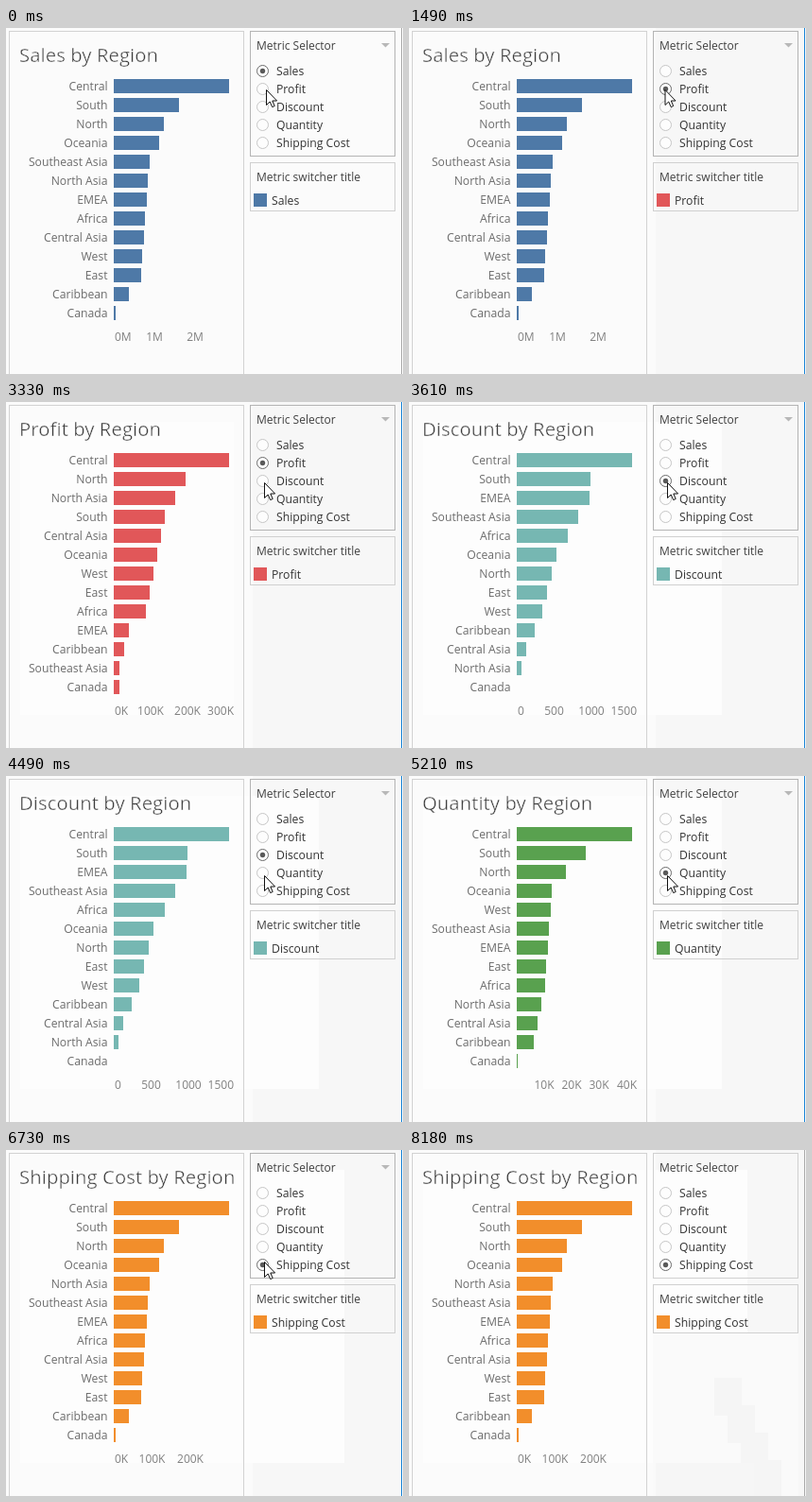
Animation of 420 by 366 pixels, one loop 8.23 s. Source, as an HTML page:

```html
<!DOCTYPE html>
<html lang="en">
<head>
<meta charset="utf-8">
<title>Metric switcher</title>
<style>
  html, body { margin: 0; width: 100%; height: 100%; overflow: hidden; background: #fbfbfb; }
  svg { display: block; }
  text { font: 12.2px "Open Sans", "Noto Sans", sans-serif; fill: #333; }
  /* The pale outline thins the strokes of the large heading. */
  .title { font-size: 20.3px; letter-spacing: .06px; fill: #3c3c3c; stroke: #fcfcfc; stroke-width: .45px; }
  .head { font-size: 12px; fill: #404040; }
  .label { fill: #6c6c6c; text-anchor: end; }
  .tick { font-size: 12px; fill: #808080; }
</style>
</head>
<body>
<svg id="stage" width="420" height="366" viewBox="0 0 420 366"></svg>
<script>
const LOOP = 8230;
const ROW = 20;
const AXIS = { zero: 114, left: 115, right: 241 };
const FOCUS = 1060, LEAVE = 7500, BLUR = 8180;

// Bar widths run straight between [row, width] key points.
const longTail = [[0, 122], [1, 69], [2, 53], [3, 48], [4, 37.5], [10, 29], [12, 2]];

const metrics = [
  { name: 'Sales', color: '#4e79a7', selected: 0, charted: 0,
    regions: 'Central,South,North,Oceania,Southeast Asia,North Asia,EMEA,Africa,Central Asia,West,East,Caribbean,Canada',
    curve: longTail, labels: '0M,1M,2M', spacing: 43 },
  { name: 'Profit', color: '#e15759', selected: 1490, charted: 1640,
    regions: 'Central,North,North Asia,South,Central Asia,Oceania,West,East,Africa,EMEA,Caribbean,Southeast Asia,Canada',
    curve: [[0, 122], [1, 76], [3, 54], [8, 34], [9, 16], [11, 6], [12, 6]],
    labels: '0K,100K,200K,300K', spacing: 39 },
  { name: 'Discount', color: '#76b7b2', selected: 3610, charted: 3610,
    regions: 'Central,South,EMEA,Southeast Asia,Africa,Oceania,North,East,West,Caribbean,Central Asia,North Asia,Canada',
    curve: [[0, 122], [1, 78], [2, 77], [5, 42], [8, 27], [10, 10], [12, 0]],
    labels: '0,500,1000,1500', spacing: 39.5 },
  { name: 'Quantity', color: '#59a14f', selected: 5210, charted: 5210,
    regions: 'Central,South,North,Oceania,West,Southeast Asia,EMEA,East,Africa,North Asia,Central Asia,Caribbean,Canada',
    curve: [[0, 122], [1, 73], [2, 52], [3, 37], [8, 30], [11, 18], [12, 1]],
    labels: ',10K,20K,30K,40K', spacing: 29 },
  { name: 'Shipping Cost', color: '#f28e2b', selected: 6730, charted: 6730,
    regions: 'Central,South,North,Oceania,North Asia,Southeast Asia,EMEA,Africa,Central Asia,West,East,Caribbean,Canada',
    curve: longTail, labels: '0K,100K,200K', spacing: 40.5 }
];

// Each move starts where the one before it ended.
const pointerStart = [275, 65];
const moves = [
  { start: 50, end: 380, to: [270.5, 65] },
  { start: 2480, end: 3210, to: [273, 85] },
  { start: 4110, end: 4490, to: [273, 105] },
  { start: 5670, end: 5960, to: [273, 118] },
  { start: 7410, end: 7620, to: [323, 241] },
  { start: 7620, end: 7840, to: [390, 368] }
];

const stage = document.getElementById('stage');

function add(tag, attrs, parent = stage, content) {
  const node = document.createElementNS('http://www.w3.org/2000/svg', tag);
  for (const key in attrs) node.setAttribute(key, attrs[key]);
  if (content !== undefined) node.textContent = content;
  parent.appendChild(node);
  return node;
}
const rect = (x, y, width, height, fill, parent) => add('rect', { x, y, width, height, fill }, parent);
const text = (x, y, cls, content, parent) => add('text', { x, y, class: cls }, parent, content);
const frame = (x, y, width, height, stroke) => add('rect', { x, y, width, height, stroke, fill: 'none' });
const show = (node, on) => node.setAttribute('visibility', on ? 'visible' : 'hidden');
const mix = (a, b, u) => a + (b - a) * u;

function widthAt(curve, row) {
  const next = Math.max(1, curve.findIndex(([key]) => key >= row));
  const [r0, w0] = curve[next - 1];
  const [r1, w1] = curve[next];
  return Math.round(mix(w0, w1, (row - r0) / (r1 - r0)));
}

// Backgrounds that appear once and stay until the loop restarts
const layers = [];
const layer = (time, ...box) => layers.push({ time, node: rect(...box) });
layer(FOCUS, 261, 0, 159, 366, '#f7f7f7');
layer(1640, 15, 21, 226, 310, '#fdfdfd');
layer(3610, 15, 21, 316, 310, '#fdfdfd');
layer(6730, 15, 21, 343, 310, '#fdfdfd');
layer(LEAVE, 258, 194, 154, 172, '#fafafa');
for (let i = 0; i < 4; i++) {
  layer(7600 + 50 * i, 323 + 14 * i, 241 + 29 * i, 29, 40, '#f5f5f5');
}
layer(7800, 261, 331, 104, 35, '#f6f6f6');

// Panels
frame(3.5, 3.5, 248, 370, '#d2d2d2');
const selectorFrame = frame(258.5, 3.5, 153, 132, '#b4b4b4');
frame(258.5, 142.5, 153, 51, '#d0d0d0');
const edge = rect(418, 0, 1, 366, '#aaa');
text(265, 23, 'head', 'Metric Selector');
text(265, 162, 'head', 'Metric switcher title');
const caret = add('path', { d: 'M397 16h9l-4.5 4.5z', fill: '#b8b8b8' });

const radios = metrics.map(({ name }, i) => {
  const cy = 45.5 + 19 * i;
  const ring = add('circle', { cx: 271.5, cy, r: 6, fill: '#fdfdfd' });
  const dot = add('circle', { cx: 271.5, cy, r: 2.7, fill: '#5a5a5a' });
  text(286, cy + 4.5, '', name);
  return { ring, dot };
});

const swatch = rect(262, 175, 14, 14, '#000');
const legend = text(281, 187, '', '');

// Axis labels stay inside the plot: the outer ones align to its sides.
function addTick(label, x, parent) {
  const atLeft = x <= AXIS.left, atRight = x > 226;
  const node = text(atLeft ? AXIS.left : atRight ? AXIS.right : x, 331, 'tick', label, parent);
  node.setAttribute('text-anchor', atLeft ? 'start' : atRight ? 'end' : 'middle');
}

const charts = metrics.map(({ name, color, regions, curve, labels, spacing }) => {
  const chart = add('g', {});
  text(14, 36, 'title', `${name} by Region`, chart);
  regions.split(',').forEach((region, i) => {
    text(107.5, 66 + ROW * i, 'label', region, chart);
    rect(AXIS.zero, 54 + ROW * i, widthAt(curve, i), 15, color, chart);
  });
  labels.split(',').forEach((label, i) => addTick(label, AXIS.zero + spacing * i, chart));
  return chart;
});

const pointer = add('path', {
  d: 'M.5 .5V16.5L4.2 13L6.7 18.6L9.2 17.5L6.8 12H11.6Z',
  fill: '#fff', stroke: '#111'
});

function pointerAt(t) {
  const stepped = Math.ceil(t / 50) * 50;
  return moves.reduce((from, { start, end, to }) => {
    const u = t < start ? 0 : Math.min(1, Math.max(0, (stepped - start) / (end - start)));
    return from.map((v, axis) => mix(v, to[axis], u));
  }, pointerStart);
}

const latest = (t, key) => metrics.filter(metric => t >= metric[key]).length - 1;

function render(t) {
  const selected = latest(t, 'selected');
  const charted = latest(t, 'charted');
  const hovered = t < LEAVE;

  for (const { time, node } of layers) show(node, t >= time);
  show(caret, hovered);
  selectorFrame.setAttribute('stroke', hovered ? '#b4b4b4' : '#d0d0d0');
  edge.setAttribute('fill', t >= FOCUS && t < BLUR ? '#1883d7' : '#aaa');

  radios.forEach(({ ring, dot }, i) => {
    ring.setAttribute('stroke', i === selected ? '#6a6a6a' : '#c6c6c6');
    show(dot, i === selected);
  });
  swatch.setAttribute('fill', metrics[selected].color);
  legend.textContent = metrics[selected].name;
  charts.forEach((chart, i) => show(chart, i === charted));
  pointer.setAttribute('transform', `translate(${pointerAt(t)})`);
}

const origin = performance.now();
function tick() {
  render((performance.now() - origin) % LOOP);
  requestAnimationFrame(tick);
}
tick();
</script>
</body>
</html>
```
